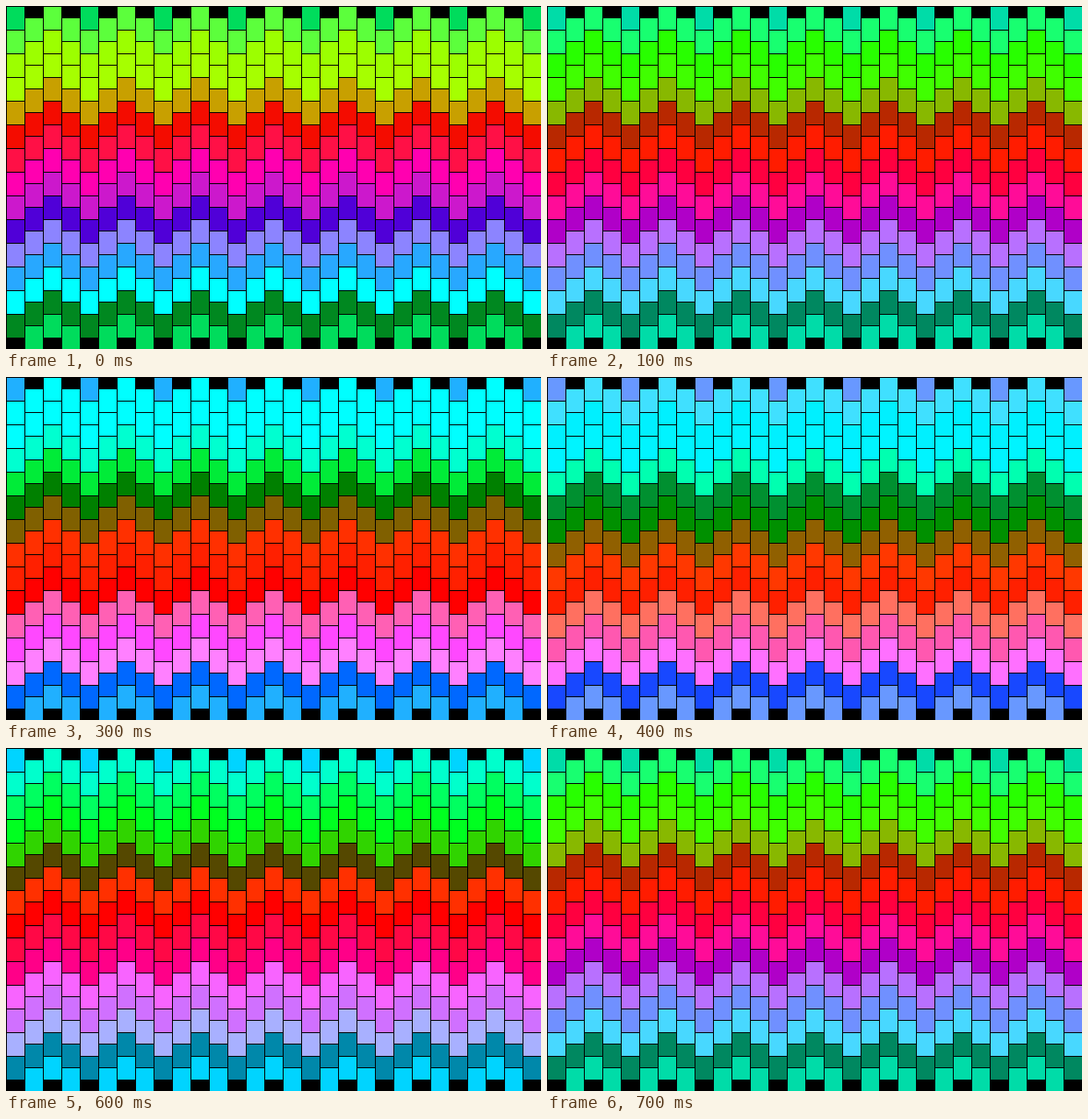
An HTML page with a canvas that plays this animation: 609 by 391 pixels, repeating every 800 ms.

```html
<!DOCTYPE html>
<html lang="en">
<head>
<meta charset="utf-8">
<title>Colour waves</title>
<style>
  html, body { margin: 0; width: 100%; height: 100%; overflow: hidden; background: #000; }
  canvas { display: block; }
</style>
</head>
<body>
<canvas id="stage" width="609" height="391"></canvas>
<script>
const ctx = document.getElementById('stage').getContext('2d');
const COLS = 29, ROWS = 14, CELL_W = 21, CELL_H = 27;
const STEP = 100;

// One cyclic palette per hue step, top band first.
const palettes = [
  '00dc5c 5cff3c 9cff00 a6ff00 c8a000 f40c00 ff1046 ff00b0 cc18cc 5000d8 8c84ff 28a8ff 00ffff 008820',
  '00dca8 18ff70 28ff00 40ff00 88b800 b82800 ff1c00 ff0040 ff0c98 b000c8 b870ff 7090ff 48d8ff 008860',
  '00d4ff 00ffcc 00ff60 00ff20 30d400 554800 ff3000 ff0000 ff0846 ff0088 f864ff d070ff a8b0ff 0088aa',
  '20b0ff 00ffff 00ffff 00ffd0 00ec38 008000 806000 ff3000 ff2000 ff0000 ff60b4 ff48ff ff80ff 0068ff',
  '6898ff 40e0ff 00f0ff 00f4ff 00ffb0 009030 009000 906000 ff3800 ff2000 ff7060 ff58b0 ff70ff 1848ff'
].map(list => list.split(' ').map(hex => '#' + hex));

function draw(palette) {
  ctx.fillStyle = '#000';
  ctx.fillRect(0, 0, 609, 391);
  for (let col = 0; col < COLS; col++) {
    const top = col % 2 ? 13 : 0;
    const shift = col % 4 ? 1 : 0;
    for (let row = 0; row < ROWS; row++) {
      ctx.fillStyle = palette[(row + shift) % palette.length];
      ctx.fillRect(col * CELL_W + 1, top + row * CELL_H + 1, CELL_W - 1, CELL_H - 1);
    }
  }
}

function tick() {
  const step = Math.floor(performance.now() / STEP) % 8;
  draw(palettes[4 - Math.abs(4 - step)]); // there and back
  requestAnimationFrame(tick);
}
tick();
</script>
</body>
</html>
```
